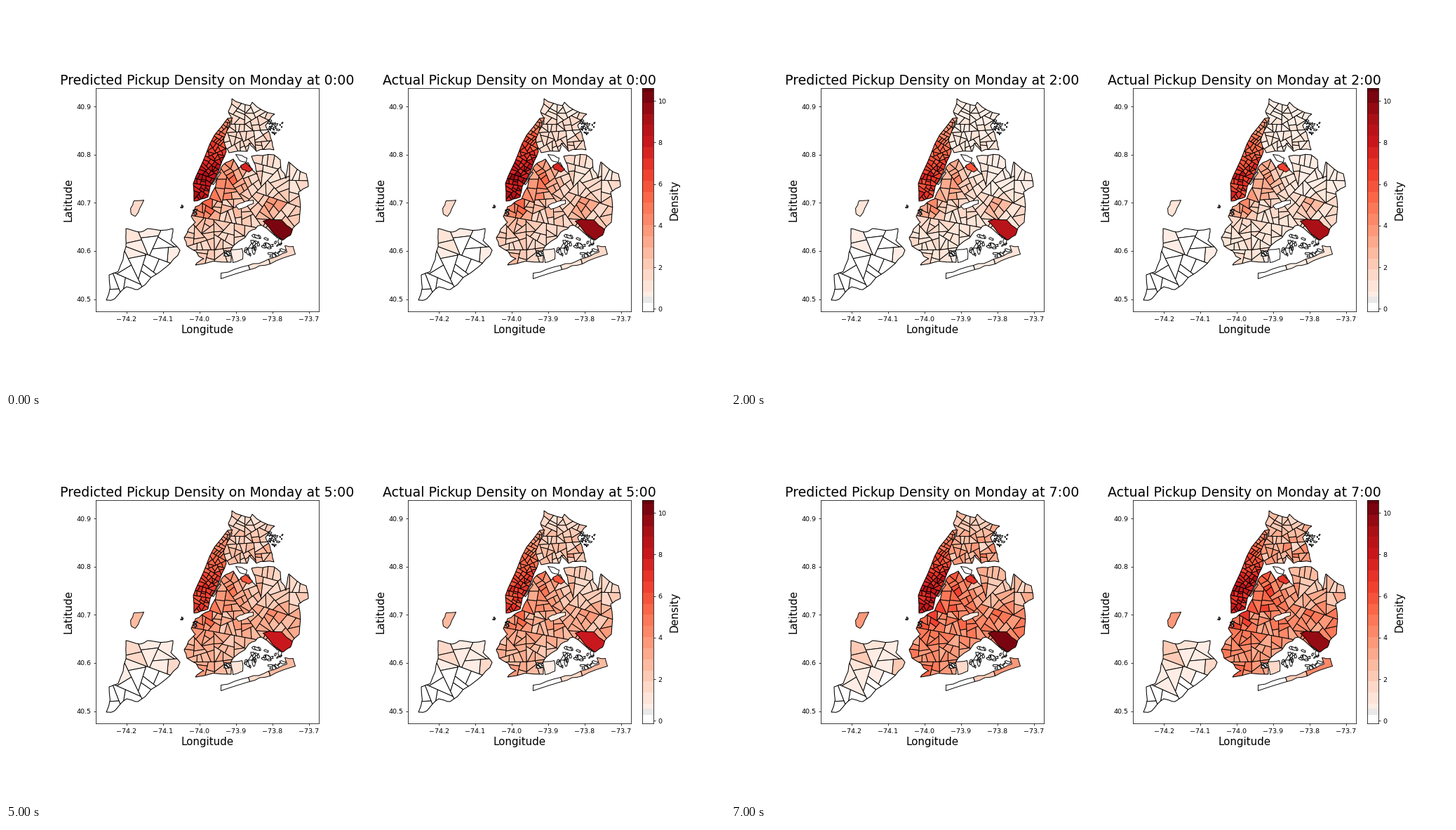
Recreate the animation shown at these times as a matplotlib script. Size 1025 px wide and 547 px high, loop 8 s.

```python
import matplotlib.pyplot as plt
import numpy as np
from matplotlib.animation import FuncAnimation
from matplotlib.collections import PolyCollection
from matplotlib.path import Path

W, H, DPI = 1025, 547, 64
K = W / 15 / DPI          # the layout is a 15 inch wide figure
LEFT, TOP, SIDE = 128.1, 117.3, 317.6
VMIN, VMAX, STEP = -0.12, 10.6, 0.535
HOURS = np.arange(8)
rng = np.random.default_rng(11)

plt.rcParams.update({
    "font.family": "DejaVu Sans", "font.size": 10 * K,
    "axes.linewidth": 0.8 * K, "axes.titlepad": 6 * K, "axes.labelpad": 4 * K,
    **{f"{a}tick.major.{k}": v * K for a in "xy"
       for k, v in (("size", 3.5), ("width", 0.8), ("pad", 3.5))},
})

# Nightlife dips before dawn; home districts are quietest at two and wake by seven.
NIGHT = 6.1 + 0.13 * (HOURS - 3.7) ** 2
HOMES = 2.2 - 1.25 * np.cos(2 * np.pi * (HOURS - 1.9) / 11)
HUBS = [(312, 248, 32), (378, 288, 16), (284, 290, 18)]   # x, y, reach

# Corner points of the coasts, in stage pixels of the left panel
MANHATTAN = [(316, 160), (323, 159), (310, 190), (314, 207), (303, 235), (291, 257),
             (288, 272), (268, 278), (267, 253), (285, 211)]
BRONX = [(322, 132), (348, 142), (351, 137), (383, 154), (370, 170), (376, 182), (382, 205),
         (357, 207), (347, 195), (344, 207), (318, 209), (310, 195), (322, 165), (317, 150)]
LONG_ISLAND = [(303, 238), (312, 224), (324, 218), (332, 231), (345, 223), (358, 240),
               (350, 214), (382, 212), (391, 219), (399, 246), (403, 222), (428, 239),
               (431, 257), (417, 265), (418, 308), (394, 333), (364, 312), (346, 322),
               (319, 350), (321, 365), (270, 369), (282, 360), (258, 342), (254, 330),
               (270, 308), (264, 300), (270, 286), (290, 275)]
STATEN = [(171, 317), (190, 322), (202, 317), (238, 317), (235, 334), (248, 348), (228, 372),
          (188, 404), (172, 400), (155, 417), (143, 419), (147, 383), (160, 378), (171, 343)]


def roughen(points, levels=2, amount=0.06):
    p = np.array(points, float)
    for _ in range(levels):
        d = np.roll(p, -1, 0) - p
        normal = np.column_stack((-d[:, 1], d[:, 0]))
        mid = p + d / 2 + normal * rng.normal(0, amount, (len(p), 1))
        p = np.stack((p, mid), 1).reshape(-1, 2)
    return p


def halfplane(poly, normal, offset):
    """Keep the part of a convex polygon behind the line."""
    side = poly @ normal - offset
    out = []
    for i, b in enumerate(poly):
        a, sa, sb = poly[i - 1], side[i - 1], side[i]
        if (sa <= 0) != (sb <= 0):
            out.append(a + (b - a) * sa / (sa - sb))
        if sb <= 0:
            out.append(b)
    return np.array(out)


def subdivide(poly, points, limit, turn):
    """Cut across the long axis until each zone holds few sample points."""
    if len(points) <= limit:
        return [(poly, points.mean(0))]
    x, y = np.linalg.eigh(np.cov(points.T))[1][:, -1]
    a = np.arctan2(y, x) + rng.normal(0, turn)
    axis = np.array((np.cos(a), np.sin(a)))
    along = points @ axis
    cut = np.quantile(along, rng.uniform(0.38, 0.62))
    return (subdivide(halfplane(poly, axis, cut), points[along <= cut], limit, turn)
            + subdivide(halfplane(poly, -axis, -cut), points[along > cut], limit, turn))


def whole_pickups(level):
    """A level is the log of a whole number of pickups."""
    return np.log1p(np.round(np.expm1(level)))


def gauss(points, x, y, reach):
    return np.exp(-((points - (x, y)) ** 2).sum(1) / reach ** 2)[:, None]


groups = []   # (polygons, hourly levels, outline to clip to)


def region(corners, zones, level, spread, turn=0.2, sparse_east=0.0, rough=0.06):
    outline = roughen(corners, 2, rough)
    low, high = outline.min(0) - 4, outline.max(0) + 4
    points = rng.uniform(low, high, (12000, 2))
    points = points[Path(outline).contains_points(points)]
    east = (points[:, 0] - low[0]) / (high - low)[0]
    points = points[rng.random(len(points)) > east * sparse_east]
    box = np.array([low, (high[0], low[1]), high, (low[0], high[1])])
    polys, centres = zip(*subdivide(box, points, 1.4 * len(points) / zones, turn))
    vary = np.exp(rng.normal(0, spread, (len(polys), 1)))
    groups.append((polys, level(np.array(centres)) * vary, outline))


def island(points, level):
    groups.append(([roughen(points, 2, 0.04)], level[None], None))


def islets(count, x, y, spread, size):
    angle = np.linspace(0, 2 * np.pi, 9, endpoint=False)
    polys = []
    for _ in range(count):
        turn, centre = rng.uniform(0, np.pi), rng.uniform(-1, 1, 2) * spread + (x, y)
        r = rng.uniform(*size) * rng.uniform(0.6, 1.3, 9)
        px, py = r * np.cos(angle), 0.5 * r * np.sin(angle)
        polys.append(centre + np.column_stack((px * np.cos(turn) - py * np.sin(turn),
                                               px * np.sin(turn) + py * np.cos(turn))))
    groups.append((polys, np.zeros((count, 8)), None))


def downtown(p):
    return np.interp(p[:, 1], (160, 235), (0.5, 1.02))[:, None] * NIGHT


def suburbs(p):
    quiet = 1.15 - 0.5 * gauss(p, 405, 232, 45)
    hubs = sum(gauss(p, *hub) for hub in HUBS)
    return np.hypot(quiet * HOMES, 0.58 * NIGHT * hubs)


def uptown(p):
    return HOMES * (0.95 - 0.6 * gauss(p, 350, 140, 18))


def outskirts(p):
    return HOMES * (0.1 + 0.5 * gauss(p, 185, 340, 20) + 0.3 * gauss(p, 238, 350, 15))


region(STATEN, 20, outskirts, 0.4)
region(BRONX, 46, uptown, 0.22)
region(LONG_ISLAND, 125, suburbs, 0.16, sparse_east=0.5)
region(MANHATTAN, 69, downtown, 0.06, turn=0.1, rough=0.03)

islets(36, 368, 341, (28, 15), (1.5, 5.5))
islets(22, 384, 172, (11, 12), (0.8, 3.2))
islets(6, 316, 353, (2.5, 3), (3, 6))
islets(6, 268, 288, (3, 10), (1.2, 3.2))
islets(2, 252, 284, (2, 4), (1, 2))

# Airports, parks and the barrier beach
island([(366, 306), (374, 303), (392, 304), (408, 318), (405, 326), (394, 333), (384, 326)],
       1.3 * NIGHT)
island([(334, 227), (341, 223), (351, 232), (346, 236), (336, 232)], 0.95 * NIGHT)
island([(177, 288), (182, 277), (196, 276), (184, 299), (178, 296)], 1.1 * HOMES)
island([(327, 284), (340, 278), (352, 276), (352, 281), (331, 289)], 0.2 * HOMES)
island([(320, 347), (336, 345), (337, 360), (323, 365)], 0.4 * HOMES)
island([(306, 380), (345, 369), (347, 375), (330, 380), (306, 388)], 0 * HOMES)
island([(345, 369), (374, 360), (376, 367), (347, 375)], 0.7 * HOMES)
island([(374, 360), (400, 350), (397, 341), (409, 342), (412, 353), (376, 367)], 1.15 * HOMES)
island([(327, 211), (334, 212), (343, 216), (342, 222), (333, 220)], 0 * HOMES)
island([(293, 253), (304, 236), (306, 237), (295, 254)], HOMES)


def colour(v):
    v = np.clip(v, 0, VMAX)
    rgba = plt.cm.Reds(np.round(v / STEP) * STEP / VMAX)
    rgba[v < 0.58] = (0.92, 0.91, 0.91, 1)
    rgba[v < 0.27] = 1
    return rgba


fig = plt.figure(figsize=(W / DPI, H / DPI), dpi=DPI, facecolor="white")


def stage_axes(x, width):
    return fig.add_axes([x / W, 1 - (TOP + SIDE) / H, width / W, SIDE / H])


def panel(x, noise):
    ax = stage_axes(x, SIDE)
    ax.set(xlim=(LEFT, LEFT + SIDE), ylim=(TOP + SIDE, TOP))
    ax.set_xticks(172 + 51.9 * np.arange(6),
                  [f"\u2212{74.2 - i / 10:.1f}" for i in range(6)])
    ax.set_yticks(143.1 + 68.6 * np.arange(5), [f"{40.9 - i / 10:.1f}" for i in range(5)])
    ax.set_xlabel("Longitude", fontsize=16 * K)
    ax.set_ylabel("Latitude", fontsize=16 * K)
    shapes = []
    for z, (polys, levels, outline) in enumerate(groups):
        art = PolyCollection(polys, edgecolors="black", linewidths=K, zorder=2 + z / 50)
        ax.add_collection(art, autolim=False)
        if outline is not None:
            art.set_clip_path(Path(np.vstack((outline, outline[:1]))), ax.transData)
            ax.fill(*outline.T, fill=False, ec="black", lw=1.1 * K, zorder=2.01 + z / 50)
        noisy = levels * (1 + rng.normal(0, noise, levels.shape))
        shapes.append((art, whole_pickups(noisy)))
    return ax, shapes


panels = {"Predicted": panel(LEFT, 0.015), "Actual": panel(573.1, 0.04)}

bar = stage_axes(907, 16)
ramp = np.linspace(VMAX, VMIN, 636)
bar.imshow(colour(ramp)[:, None], extent=(0, 1, VMIN, VMAX), aspect="auto",
           interpolation="nearest")
bar.set_xticks([])
bar.set_yticks(range(0, 11, 2))
bar.yaxis.tick_right()
bar.yaxis.set_label_position("right")
bar.set_ylabel("Density", fontsize=16 * K)


def update(hour):
    for name, (ax, shapes) in panels.items():
        ax.set_title(f"{name} Pickup Density on Monday at {hour}:00", fontsize=20 * K)
        for art, levels in shapes:
            art.set_facecolor(colour(levels[:, hour]))
    return []


anim = FuncAnimation(fig, update, frames=8, interval=1000, repeat=True, repeat_delay=0)
plt.show()
```
